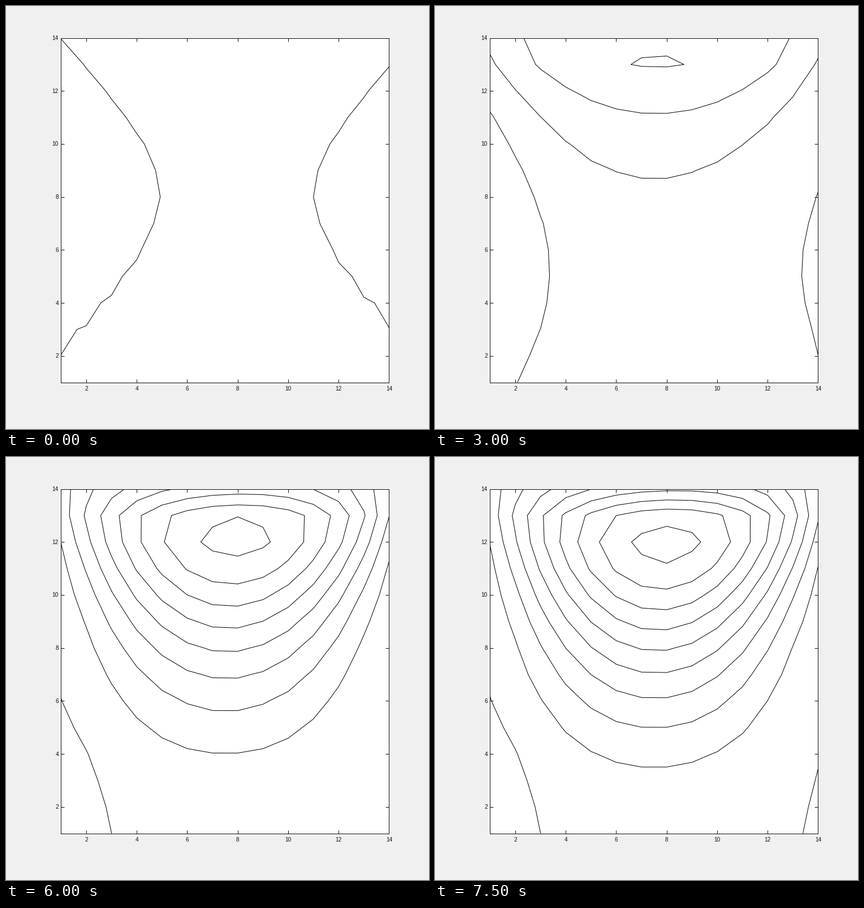
Write a matplotlib script that moves like this. It is 748 by 748 pixels and loops after 8000 ms.

```python
import numpy as np
import matplotlib.pyplot as plt
from matplotlib.animation import FuncAnimation

SIZE, DPI = 748, 100
LEFT, RIGHT, TOP, BOTTOM = 97.4, 677.4, 56.6, 665.6
WALL = 15  # the closed box spans 0..15; inner nodes 1..14 are shown
INK = "#111111"
px = 72 / DPI

nodes = np.arange(1, WALL)
X, Y = np.meshgrid(nodes, nodes)


def rise(t, middle, rate):
    return 1 / (1 + np.exp(-rate * (t - middle)))


def centre_line(y, t):
    """Stream function on the vertical mid-line: quadratic, cut off at the lid."""
    gap = WALL - y
    deep = 0.098 * rise(t, 5.5, 0.8)
    near_lid = 0.082 * rise(t, 3.05, 0.9)
    decay = 0.54 * (1 - rise(t, 5.6, 2))
    strength = deep + (near_lid - deep) * np.exp(-decay * (gap - 1))
    lid = 1 - np.exp(-0.41 * gap - 0.05 * gap ** 2)
    return strength * y ** 2 * lid


def bulk(q, power):
    """Fall-off from the mid-line (q = 0) to a side wall (|q| = 1)."""
    return (1 - q ** 2) ** (power * (0.95 + 0.3 * q ** 4))


def side_cells(q, y, t):
    """Distance from the mid-line where the flow turns back, per side."""
    middle = 8.1 * max(0, 1 - (t / 5) ** 2)
    narrow = 0.34 + 0.25 * (1 - np.exp(-(t / 2.2) ** 2))
    spread = 0.0105 + 0.008 * np.exp(-t / 2)
    width = np.sqrt(narrow ** 2 + spread * (y - middle) ** 2)
    extra = 0.125 + 0.2 * np.exp(-((t - 4.9) / 2.2) ** 2)
    return np.minimum(1, width + np.where(q > 0, extra, 0))


def stream(t):
    growth = rise(t, 4.5, 1)
    q = 2 * X / WALL - 1
    q = q - 0.13 * growth * (Y / 14) ** 4 * (1 - q ** 2)  # drift with the lid
    power = 2.9 - 2.15 * (Y / 14) ** 1.9 - 0.28 * (1 - growth)
    turn = side_cells(q, Y, t)
    k = (q / turn) ** 6
    return centre_line(Y, t) * (bulk(q, power) - bulk(turn, power) * 2 * k / (1 + k))


fig = plt.figure(figsize=(SIZE / DPI, SIZE / DPI), dpi=DPI, facecolor="#f0f0f0")
ax = fig.add_axes([LEFT / SIZE, 1 - BOTTOM / SIZE,
                   (RIGHT - LEFT) / SIZE, (BOTTOM - TOP) / SIZE])
ticks = range(2, 15, 2)
ax.set(xlim=(1, 14), ylim=(1, 14), xticks=ticks, yticks=ticks)
ax.tick_params(direction="in", length=6 * px, width=px, color=INK, top=True, right=True,
               labelbottom=False, labelleft=False)
for spine in ax.spines.values():
    spine.set(linewidth=px, color=INK)


def label(x, y, text, align):
    fig.text(x / SIZE, 1 - y / SIZE, text, ha=align, va="baseline",
             family="Liberation Sans", size=10 * px, color=INK)


for n in ticks:
    share = (n - 1) / 13
    label(LEFT + share * (RIGHT - LEFT), 679.5, str(n), "center")
    label(93, BOTTOM - share * (BOTTOM - TOP) + 3.5, str(n), "right")

drawn = []


def draw(frame):
    while drawn:
        drawn.pop().remove()
    field = stream(frame * 0.5)
    levels = [n for n in range(10) if field.min() < n < field.max()]
    drawn.append(ax.contour(X, Y, field, levels=levels, colors="black",
                            linewidths=px, linestyles="solid"))
    ax.set(xlim=(1, 14), ylim=(1, 14))
    return []


anim = FuncAnimation(fig, draw, frames=16, interval=500, init_func=lambda: [],
                     repeat=True, repeat_delay=0, blit=False)
plt.show()
```
